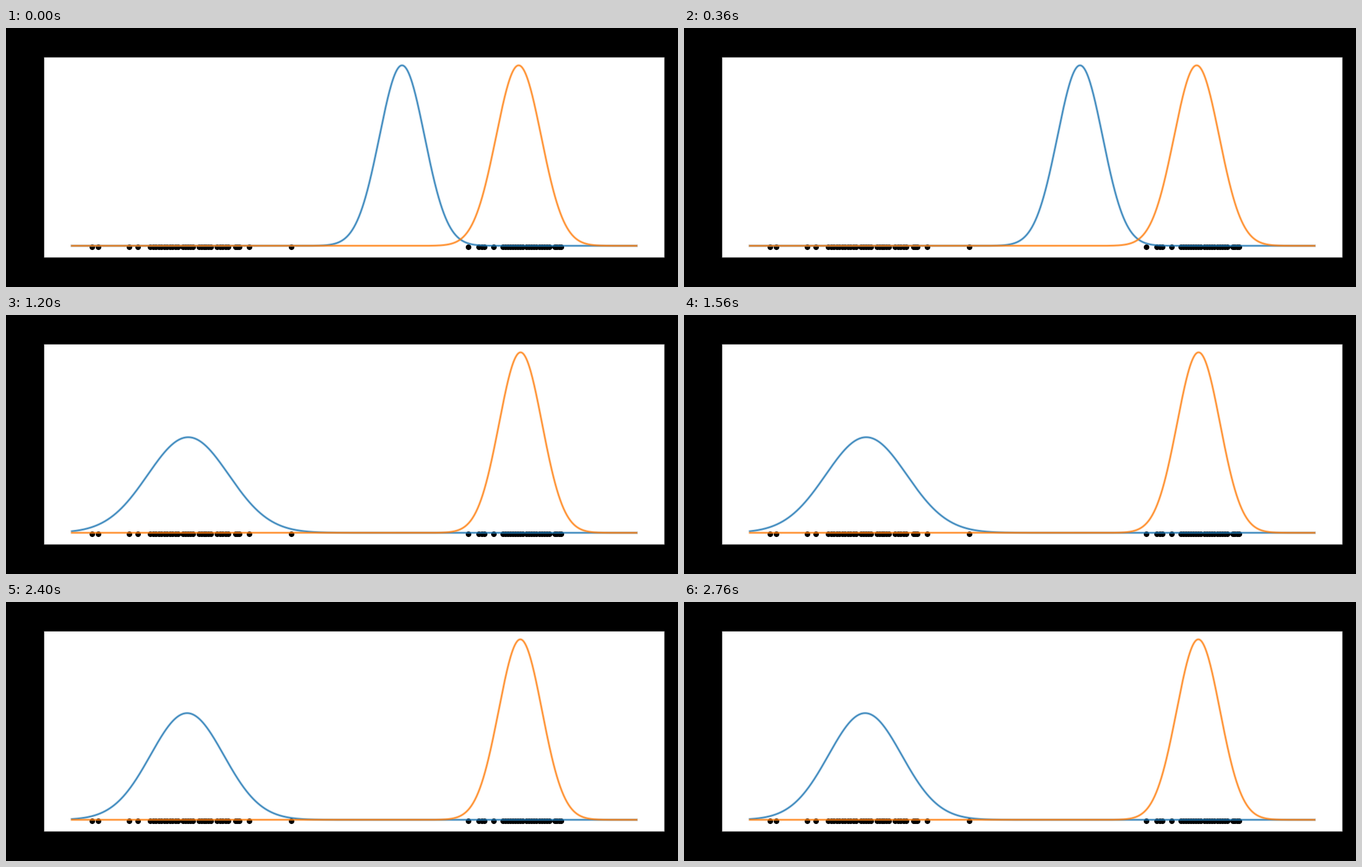
Animation of 1086 by 420 pixels, one loop 3 s. Source, as a matplotlib script:

```python
import numpy as np
import matplotlib.pyplot as plt
from matplotlib.animation import FuncAnimation
from matplotlib.patches import Rectangle
from matplotlib.patheffects import Stroke

W, H, DPI = 1086, 420, 100
PX = 72 / DPI
UNIT = 36.45                    # pixels per data unit
BASE, TOP = 353.2, 60.6
DOT_Y, DOT_SIZE, DOT_GAP = 354.6, 9.0, 4.5
SOFT = [Stroke(linewidth=4.0 * PX, alpha=0.35),
        Stroke(linewidth=2.0 * PX, alpha=0.8)]

# Each step: (mean, sigma) in pixels for the two components.
STEPS = [
    ((640.0, UNIT), (828.5, UNIT)),
    ((294.5, 65.5), (831.6, 34.7)),
    ((292.7, 59.2), (831.2, 35.0)),
]

fig = plt.figure(figsize=(W / DPI, H / DPI), dpi=DPI, facecolor="black")
ax = fig.add_axes([0, 0, 1, 1])
ax.set(xlim=(0, W), ylim=(H, 0))
ax.axis("off")
ax.add_patch(Rectangle((62, 48), 1001.7, 323.8, facecolor="white",
                       edgecolor=(1, 1, 1, 0.4), lw=1.6 * PX,
                       snap=False, zorder=0))

x = np.linspace(106.5, 1018.9, 1000)


def add_dots(singles, runs):
    """Scatter lone dots plus evenly filled runs along the baseline."""
    filled = [np.linspace(a, b, int(np.ceil((b - a) / DOT_GAP)) + 1)
              for a, b in runs]
    xs = np.concatenate([singles, *filled])
    return ax.scatter(xs, np.full(len(xs), DOT_Y), s=(DOT_SIZE * PX) ** 2,
                      linewidths=0, snap=False, zorder=1)


def add_curve(color):
    return ax.plot(x, np.full_like(x, BASE), color=color, path_effects=SOFT,
                   solid_capstyle="projecting", snap=False, zorder=2)[0]


dots = [
    add_dots([139, 149, 199, 213, 393, 461],
             [(233, 278), (286, 302), (312, 331), (341, 359), (371, 377)]),
    add_dots([747, 788], [(764, 773), (803, 835), (841, 878), (887, 897)]),
]
curves = [add_curve("#1f77b4"), add_curve("#ff7f0e")]


def draw(frame):
    """Even frames show refitted curves, odd frames the cluster assignment."""
    step = STEPS[frame // 2]
    narrowest = min(sigma for _, sigma in step)
    for curve, (mean, sigma) in zip(curves, step):
        height = (BASE - TOP) * narrowest / sigma
        curve.set_ydata(BASE - height * np.exp(-0.5 * ((x - mean) / sigma) ** 2))
    colors = ("blue", "orange") if frame % 2 else ("black", "black")
    for group, color in zip(dots, colors):
        group.set_facecolor(color)
    return curves + dots


anim = FuncAnimation(fig, draw, frames=5, interval=600, repeat=True,
                     repeat_delay=0, blit=False)
plt.show()
```
